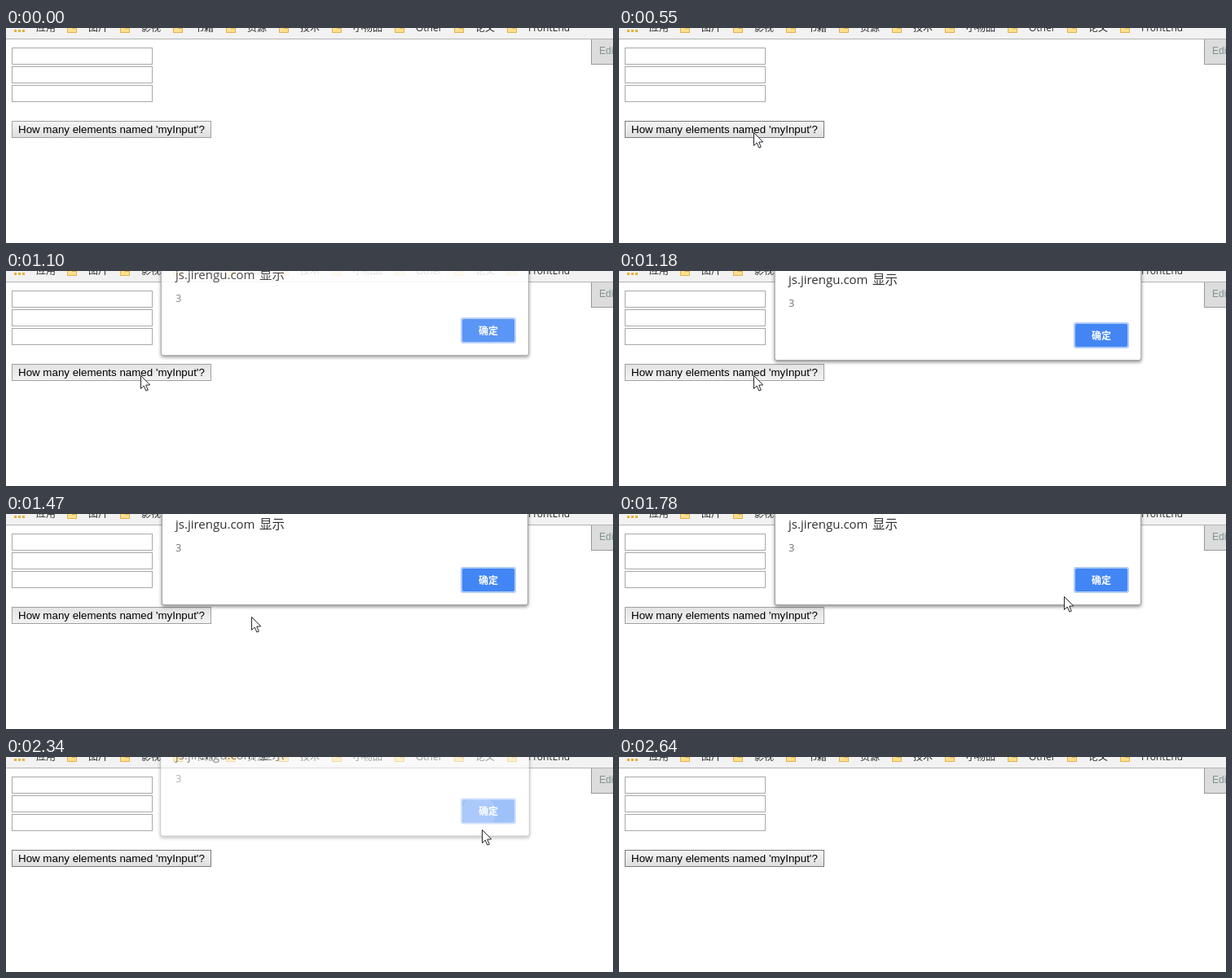
These frames come from a looping animation (745 px wide and 264 px high, 3040 ms). An HTML page with a canvas:

```html
<!DOCTYPE html>
<html lang="en">
<head>
<meta charset="utf-8">
<title>Counting inputs by name</title>
<style>
  html, body { margin: 0; width: 100%; height: 100%; overflow: hidden; background: #fff; }
  canvas { display: block; width: 745px; height: 264px; }
</style>
</head>
<body>
<canvas id="stage" width="745" height="264"></canvas>
<script>
const W = 745, H = 264, LOOP = 3040;
const PRESS = 870, OPEN = 1020, CLICK = 2120, CLOSE = 2270, CLOSED = 2360;
const UI = '"Open Sans", "Noto Sans CJK SC", "Noto Sans CJK", sans-serif';
const ARIAL = '"Liberation Sans", Arial, sans-serif';
const bookmarks = ['图片', '影视', '书籍', '资源', '技术', '小物品', 'Other', '论文', 'FrontEnd'];

// Pointer moves: curved legs walked in equal steps, then held until the next
const legs = [
  { at: 70, step: 80, count: 6, from: [475, 250], bend: [165, 175], to: [165, 127] },
  { at: 1392, step: 77, count: 7, from: [203, 130], bend: [570, 114], to: [582, 84] },
  { at: CLOSE, step: 82, count: 4, from: [584, 88], bend: [728, 255], to: [707, 254] }
];
const GONE = 2640;

const screen = document.getElementById('stage').getContext('2d');
const layer = document.createElement('canvas');
layer.width = W;
layer.height = H;
const layerCtx = layer.getContext('2d');
let ctx = screen;

const stepsSince = (t, start, step) => Math.floor((t - start) / step);

function fill(color, x, y, w, h) {
  ctx.fillStyle = color;
  ctx.fillRect(x, y, w, h);
}

function box(color, x, y, w, h) {
  ctx.strokeStyle = color;
  ctx.lineWidth = 1;
  ctx.strokeRect(x + 0.5, y + 0.5, w - 1, h - 1);
}

function round(color, x, y, w, h, r) {
  ctx.fillStyle = color;
  ctx.beginPath();
  ctx.roundRect(x, y, w, h, r);
  ctx.fill();
}

function text(str, x, y, font, color) {
  ctx.font = font;
  ctx.fillStyle = color;
  ctx.fillText(str, x, y);
}

function drawFolder(x) {
  fill('#e3b04f', x, -4, 12, 10);
  fill('#fde08c', x + 1, -3, 10, 8);
  fill('#e3b04f', x + 6, 0, 5, 1);
}

function drawBar() {
  fill('#f2f2f2', 0, 0, W, 13);
  fill('#b5b3b5', 0, 13, W, 1);
  for (let x = 10; x <= 20; x += 5) fill('#e9ae3b', x, 2, 3, 3);
  text('应用', 37, 4, '12px ' + UI, '#2b2b2b');
  let x = 101;
  for (const label of bookmarks) {
    drawFolder(x - 26);
    text(label, x, 4, '12px ' + UI, '#2b2b2b');
    x += Math.ceil(ctx.measureText(label).width) + 40;
  }
}

function drawPage(t) {
  for (let i = 0; i < 3; i++) box('#a9a9a9', 7, 24 + i * 23, 173, 21);

  const pressed = t >= PRESS && t < CLICK;
  const hover = t >= 470 && !pressed;
  const shade = ctx.createLinearGradient(0, 114, 0, 135);
  shade.addColorStop(0, pressed ? '#e3e3e3' : '#f6f6f6');
  shade.addColorStop(1, pressed ? '#f3f3f3' : '#dddddd');
  round(shade, 7, 114, 245, 21, 1.5);
  box(hover ? '#7c7a7c' : '#a2a0a2', 7, 114, 245, 21);
  text("How many elements named 'myInput'?", 15, 129, '13.333px ' + ARIAL, '#000');

  fill('#dcdcdc', 718, 14, 27, 31);
  fill('#999', 718, 14, 1, 31);
  fill('#999', 718, 44, 27, 1);
  text('Edit', 728, 32, '12px ' + ARIAL, '#7f9391');
}

function drawRipple(t) {
  const radius = 7 * (stepsSince(t, CLICK, 76) + 1);
  ctx.save();
  ctx.beginPath();
  ctx.rect(560, 67, 64, 28);
  ctx.clip();
  ctx.fillStyle = 'rgba(255,255,255,0.14)';
  ctx.beginPath();
  ctx.arc(580, 83, radius, 0, Math.PI * 2);
  ctx.fill();
  ctx.restore();
}

function drawConfirm(t) {
  round('#aecbfa', 558, 65, 68, 32, 3);
  round(t >= 1860 ? '#4d8df6' : '#4285f4', 560, 67, 64, 28, 2);
  if (t >= CLICK) drawRipple(t);
  text('确定', 580, 86, 'bold 12px ' + UI, '#fff');
}

function drawPanel(t, grow) {
  ctx.save();
  ctx.shadowColor = 'rgba(0,0,0,0.45)';
  ctx.shadowBlur = 4;
  ctx.shadowOffsetY = 2;
  round('#a4a4a4', 191 - grow, -41, 450 + grow * 2, 153, 3);
  ctx.restore();
  round('#fff', 192 - grow, -40, 448 + grow * 2, 151, 2);
  text('js.jirengu.com', 208, 18, '15px ' + UI, '#2f2f2f');
  text('显示', 311, 18, '15.5px ' + UI, '#2f2f2f');
  text('3', 208, 46, '13px ' + UI, '#757575');
  drawConfirm(t);
}

// How far the dialog is from fully shown: 0 is at rest
function hiddenness(t) {
  return t < CLOSE ? Math.max(0, 1 - stepsSince(t, OPEN, 76) / 3) : 0.9;
}

function drawDialog(t) {
  if (t < OPEN || t >= CLOSED) return;
  const q = hiddenness(t);
  // Flattened first, so that the shadow never shows through the panel
  ctx = layerCtx;
  ctx.clearRect(0, 0, W, H);
  ctx.save();
  ctx.translate(0, -18 * q * q);
  drawPanel(t, 2.25 * q * q);
  ctx.restore();
  ctx = screen;
  ctx.globalAlpha = 1 - 0.7 * q ** 4;
  ctx.drawImage(layer, 0, 0);
  ctx.globalAlpha = 1;
}

function pointerAt(t) {
  const leg = legs.filter(l => t >= l.at).pop();
  if (!leg || t >= GONE) return null;
  const p = Math.min(1, stepsSince(t, leg.at, leg.step) / leg.count);
  const r = 1 - p;
  return leg.from.map((a, i) => Math.round(r * r * a + 2 * r * p * leg.bend[i] + p * p * leg.to[i]));
}

function drawPointer(t) {
  const pos = pointerAt(t);
  if (!pos) return;
  ctx.save();
  ctx.translate(pos[0] + 0.5, pos[1] + 1.5);
  const arrow = new Path2D('M0 0V16L3.7 12.6 6.4 18.6 8.8 17.6 6.2 11.7 11.2 11.4Z');
  ctx.fillStyle = '#fff';
  ctx.fill(arrow);
  ctx.strokeStyle = '#25252d';
  ctx.lineWidth = 1;
  ctx.stroke(arrow);
  ctx.restore();
}

function draw(t) {
  fill('#fff', 0, 0, W, H);
  drawBar();
  drawPage(t);
  drawDialog(t);
  drawPointer(t);
}

const start = performance.now();
function tick() {
  draw((performance.now() - start) % LOOP);
  requestAnimationFrame(tick);
}
tick();
</script>
</body>
</html>
```
